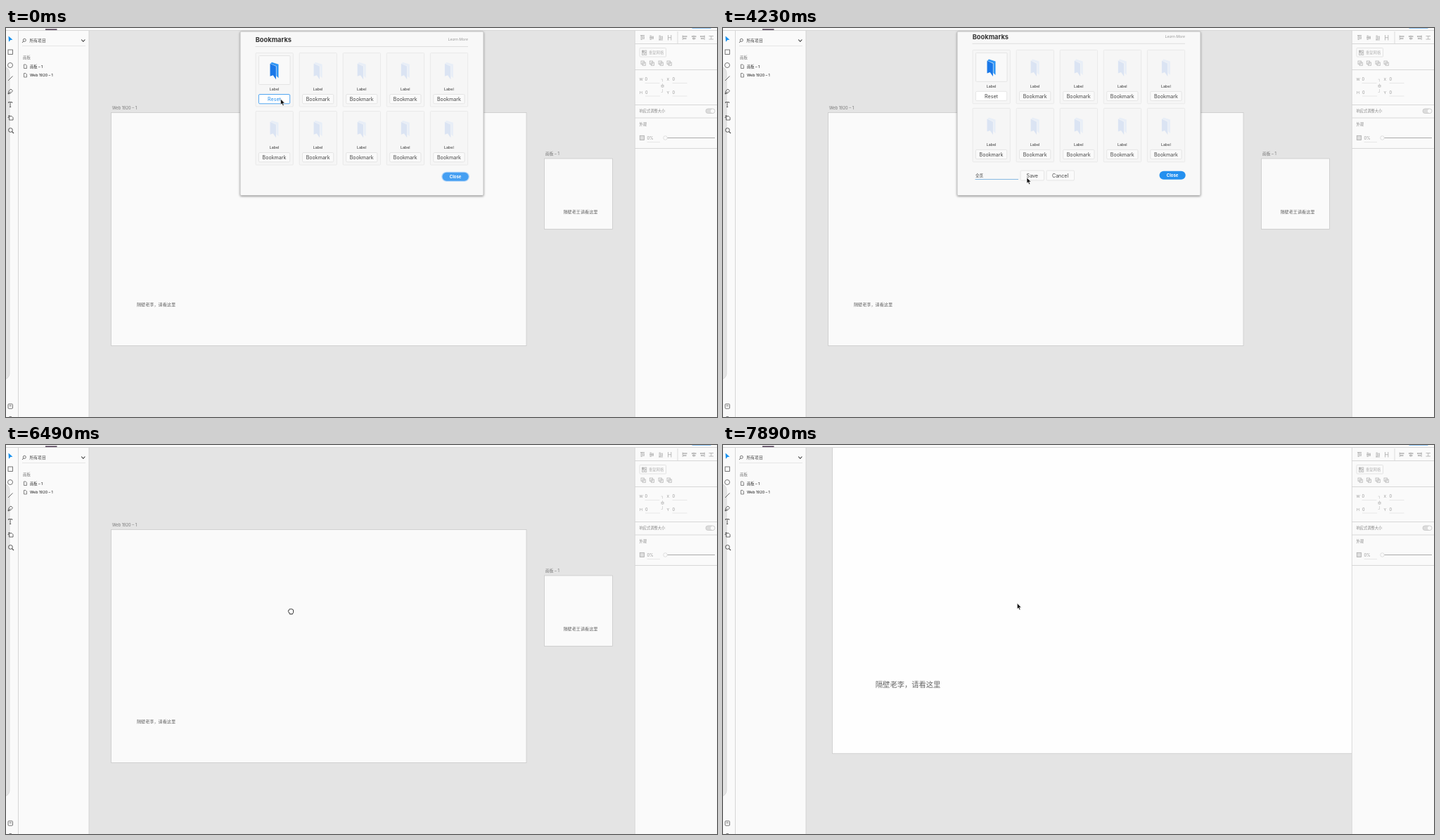
Write an HTML page that moves like this. It is 1011 px wide and 554 px high and loops after 8 s.

```html
<!DOCTYPE html>
<html lang="zh-CN">
<head>
<meta charset="utf-8">
<title>Bookmarks</title>
<style>
html, body { margin: 0; width: 100%; height: 100%; overflow: hidden; background: #e4e4e4; }
svg { display: block; width: 100%; height: 100%; }
text { font-family: Inter, "Noto Sans CJK SC", "Noto Sans CJK", sans-serif; white-space: pre; }
</style>
</head>
<body>
<svg viewBox="0 0 1011 554">
  <defs>
    <filter id="shadow" x="-10%" y="-20%" width="120%" height="150%">
      <feDropShadow dx="0" dy="1" stdDeviation="1.6" flood-opacity=".4"/>
    </filter>
  </defs>
  <g id="board"></g>
  <g id="panels"></g>
  <g id="dialog"></g>
  <g id="cursor"></g>
</svg>
<script>
const LOOP = 8000;
const layer = id => document.getElementById(id);

const rect = (x, y, w, h, fill, stroke = 'none', r = 0, extra = '') =>
  `<rect x="${x}" y="${y}" width="${w}" height="${h}" rx="${r}" fill="${fill}" stroke="${stroke}" stroke-width=".8" ${extra}/>`;
const path = (d, stroke, fill = 'none', width = .9) =>
  `<path d="${d}" stroke="${stroke}" fill="${fill}" stroke-width="${width}"/>`;
const text = (x, y, size, fill, str, extra = '') =>
  `<text x="${x}" y="${y}" font-size="${size}" fill="${fill}" ${extra}>${str}</text>`;
const centred = (x, y, size, fill, str, extra = '') =>
  text(x, y, size, fill, str, 'text-anchor="middle" ' + extra);
const move = (x, y, content) => `<g transform="translate(${x} ${y})">${content}</g>`;

// Each track entry is [start time, ...values]; values hold until the next entry.
const at = (track, t) => track.findLast(entry => entry[0] <= t).slice(1);

const POINTER = [
  [0, 390.5, 101], [170, 388.5, 99.5], [500, 386, 91], [850, 380, 86],
  [1210, 372, 130], [1390, 358, 185], [1560, 335, 208], [1740, 323, 210],
  [3870, 335, 210], [4050, 380, 213], [4230, 432, 213], [4400, 440, 212],
  [4760, 589, 207], [4970, 655, 211], [5150, 644, 212], [5320, 639.3, 211.5],
  [5860, 560, 250], [6030, 268, 280], [6210, 320, 292], [6490, 405, 237],
  [6670, 545, 168], [6810, 553, 153], [7380, 417.3, 225.3], [7890, 418.3, 225.3]
];
// Left, top and zoom of the large artboard.
const CAMERA = [
  [0, 149.5, 120.5, 1], [6670, 289.5, 51.5, 1], [6810, 297.5, 36.5, 1],
  [7380, 265.5, 8, 1.154], [7650, 210.5, -55, 1.417], [7890, 155.5, -118.5, 1.68]
];
const TYPING = [
  [0, 'Label', ''],
  [2270, 'q', '去 请 却 前 钱 其 起 群'],
  [2450, 'qu', '去 取 区 曲 趣 渠 屈 驱'],
  [2620, 'quan', '全 圈 权 泉 劝 拳 犬 券'],
  [2800, 'quan l', '全力 全 圈 权 泉 劝 拳 犬'],
  [2980, 'quan lan', '全览 全 圈 权 泉 劝 拳 犬'],
  [3510, '全览', '']
];
const EDIT_START = 1030, EDIT_END = 4580, DIALOG_END = 5680, GRAB = [6490, 7380];

function drawBoard(t) {
  const [left, top, zoom] = at(CAMERA, t);
  const paper = t < GRAB[0] + 180 ? '#fafafa' : '#fefefe';
  const artboard = (dx, dy, w, h, name, tx, ty, note) => {
    const x = left + dx * zoom, y = top + dy * zoom;
    return rect(x, y, w * zoom, h * zoom, paper, '#cacaca')
      + text(x + 1.5, y - 4.8, 5.7, '#777', name)
      + text(x + tx * zoom, y + ty * zoom, 6.13 * zoom, '#666', note);
  };
  return rect(0, 0, 1011, 554, '#e4e4e4')
    + artboard(0, 0, 590.5, 332, 'Web 1920 – 1', 36.5, 275.8, '隔壁老李，请看这里')
    + artboard(616, 65.5, 97, 100.5, '画板 – 1', 27, 78.1, '隔壁老王请看这里');
}

function drawTools() {
  const ink = '#555';
  return rect(0, 3.5, 118, 551, '#fafafa')
    + rect(-9, 56, 14, 444, '#e4e4e4', '#d2d2d2', 8)
    + path('M17.5 3.5V554M118 3.5V554', '#d2d2d2')
    + path('M3.5 11.5L9.5 16.7L6.4 17L4 19.8Z', 'none', '#1590f0')
    + rect(3, 31, 6.5, 6.5, 'none', ink)
    + `<circle cx="6" cy="53" r="3.5" fill="none" stroke="${ink}" stroke-width=".8"/>`
    + path('M3 75L9.5 68.5', ink)
    + path('M3 94L4 89.5L7 87L9.5 89.5L7 92.5ZM3 94L6.3 90.6', ink)
    + path('M3.5 107V105.5H8.7V107M6.1 105.5V112.5M5 112.5H7.2', ink)
    + path('M4.5 124V131H10V127.5L8 125.5H3M2.5 127.5H4.5', ink)
    + `<circle cx="6.4" cy="145.4" r="2.9" fill="none" stroke="${ink}"/>` + path('M8.5 147.5L11 150', ink, 'none', 1.2)
    + rect(3, 535.5, 6.5, 6.5, 'none', ink, 1) + path('M4.5 538H8M4.5 553.7H8', ink);
}

function drawLeftPanel() {
  const file = (y, name) => path(`M25.5 ${y - 2.5}H28L29.5 ${y - 1}V${y + 3}H25.5Z`, '#555', 'none', .7)
    + text(34, y + 2.2, 5.3, '#333', name, 'font-weight="500"');
  return `<circle cx="26.3" cy="17.3" r="2" fill="none" stroke="#555" stroke-width=".8"/>`
    + path('M24.9 18.8L23 21', '#555')
    + text(33.5, 20.2, 5.8, '#444', '所有项目')
    + path('M107.2 16.5L109.8 19.3L112.4 16.5', '#333', 'none', 1.1)
    + path('M23 25.5H113', '#dedede', 'none', .7)
    + text(24, 44.2, 5.4, '#777', '画板')
    + file(54.5, '画板 – 1') + file(67, 'Web 1920 – 1');
}

function drawRightPanel() {
  const soft = '#b4b4b4', line = '#dadada';
  const vertical = (x, edge) => path(`M${x - 3} ${edge}H${x + 3}`, soft)
    + rect(x - 2, 11, 1.3, 5.5, 'none', soft) + rect(x + 1, 12, 1.3, 3.5, 'none', soft);
  const horizontal = (x, edge) => path(`M${x + edge} 10.5V17`, soft)
    + rect(x - 2.5, 11.5, 5.5, 1.2, 'none', soft) + rect(x - 1.5, 14.5, 3.5, 1.2, 'none', soft);
  const field = (x, y, name) => text(x, y + 2, 5.3, '#999', name)
    + text(x + 8, y + 2.1, 5.6, '#999', '0') + path(`M${x + 8} ${y + 5.5}H${x + 29}`, line, 'none', .6);
  const combine = x => rect(x - 3, 47, 4.3, 4.3, 'none', soft) + rect(x - 1, 49, 4.3, 4.3, 'none', soft);
  return rect(894, 3.5, 118, 551, '#fafafa')
    + path('M894.3 3.5V554M894 22.5H1011M894 59.5H1011M894 109.5H1011M894 128H1011M894 171.5H1011', '#d4d4d4')
    + path('M955 5V22', line)
    + vertical(905, 10.5) + vertical(918, 13.7) + vertical(931, 17) + path('M941.5 10V17.5M945.8 10V17.5M941.5 13.7H945.8', soft)
    + horizontal(965, -2.8) + horizontal(978, 0) + horizontal(990, 3.2) + path('M999.5 11.5H1006M999.5 16H1006M1002.7 11.5V16', soft)
    + rect(901, 28.5, 37.5, 12.5, 'none', '#dedede', 1)
    + rect(904.5, 32, 2.5, 2.5, soft, soft) + rect(908.3, 32, 2.5, 2.5, 'none', soft)
    + rect(904.5, 35.8, 2.5, 2.5, 'none', soft) + rect(908.3, 35.8, 2.5, 2.5, 'none', soft)
    + text(914, 37, 5.3, soft, '重复网格')
    + [906, 918.3, 931, 943].map(combine).join('')
    + field(900.5, 73, 'W') + field(939.5, 73, 'X') + field(901, 91.5, 'H') + field(939.5, 91.5, 'Y')
    + path('M931.5 73H933.5V76.5M933.5 87V91.5H931.5M933.5 79V85', '#ccc', 'none', .7)
    + rect(932, 81.5, 3, 2.4, '#fafafa', soft)
    + text(900.5, 120.2, 5.25, '#888', '响应式调整大小')
    + rect(995, 115, 13, 6.5, '#dcdcdc', '#c6c6c6', 3.2) + '<circle cx="1004.7" cy="118.2" r="2.7" fill="#fafafa"/>'
    + text(900.5, 139.2, 5.25, '#888', '外观')
    + rect(901.3, 153.3, 6.2, 6.2, '#dedede', '#aaa')
    + text(911.5, 158.6, 5.7, '#999', '0%') + path('M911.5 162.5H930', line, 'none', .6)
    + path('M937 156.5H1008', '#aaa', 'none', 1.1)
    + '<circle cx="937.5" cy="156.5" r="2.8" fill="#fafafa" stroke="#d4d4d4" stroke-width=".7"/>';
}

function drawTopStrip() {
  return rect(0, 0, 1011, 3.5, '#fafafa') + path('M0 3.5H1011', '#d4d4d4')
    + rect(56, 1.3, 16.5, 1.7, '#5c4a60')
    + rect(973.5, -8, 31, 8.6, '#2490ef', 'none', 4);
}

function drawCard(index, t) {
  const first = index === 0;
  const x = 355 + index % 5 * 62.1, y = index < 5 ? 35.5 : 118.5;
  const focused = first && t < 500;
  const front = first ? '#1a78e8' : '#dbe4f3', back = first ? '#2f96f5' : '#e8eef7';
  const label = first && t >= EDIT_END ? '全览' : 'Label';
  return move(x, y,
    rect(0, 0, 53.3, 76.5, '#f6f6f6', '#e6e6e6', 1)
    + (first ? rect(4.5, 4, 44.5, 41, '#f9f9f9', '#e0e0e0', 1) : '')
    + move(26.5, 24.7, path('M-3.5 -11.5L6 -8.5V11L3 8V-6L-5.5 -9.5Z', 'none', back)
      + path('M-6 -9.5L2.4 -5.6V13L-1.8 7L-6 8.5Z', 'none', front))
    + centred(26.5, 53.7, 5.3, '#333', label)
    + rect(4.4, 59, 44.3, 13.3, first ? '#fff' : '#fafafa', focused ? '#2790ee' : '#e0e0e0', 1.5)
    + centred(26.5, 68.3, 7.1, focused ? '#2790ee' : '#444', first ? 'Reset' : 'Bookmark'));
}

function drawCandidates(list) {
  const words = list.split(' ');
  let x = 353.5;
  let out = rect(350, 216.8, 204, 14, '#fcfcfc', '#b8b8b8', 3.5, 'filter="url(#shadow)"')
    + rect(352, 218.3, 8.3 + words[0].length * 8.4, 11, '#d3e6fb', 'none', 1.5);
  words.forEach((word, i) => {
    out += text(x, 225.8, 5.6, '#999', i + 1) + text(x + 5, 226.8, 8.4, '#111', word, 'font-weight="500"');
    x += 11.8 + word.length * 8.4;
  });
  return out + path('M544 222.2L546.7 224.8L549.4 222.2', '#888');
}

function drawEditor(t) {
  const [value, candidates] = at(TYPING, t);
  const selected = value === 'Label', composing = candidates !== '';
  const width = value.length * 2.95;
  return (selected ? rect(358.7, 206, 15.3, 8, '#a9cff6') : '')
    + text(359, 212.2, 5.6, '#444', value, composing ? 'text-decoration="underline"' : '')
    + (composing ? path(`M${359 + width} 206.3V214`, '#333', 'none', .7) : '')
    + path('M358.5 215.5H420', '#6ba9dc', 'none', .8)
    + rect(423, 203, 33.5, 14, '#fafafa', '#e0e0e0', 1.5) + centred(439.8, 212.7, 7.1, '#444', 'Save')
    + rect(460, 203, 39.5, 14, '#fafafa', '#e0e0e0', 1.5) + centred(479.6, 212.7, 7.1, '#444', 'Cancel')
    + (composing ? drawCandidates(candidates) : '');
}

function drawDialog(t) {
  if (t >= DIALOG_END) return '';
  const editing = t >= EDIT_START && t < EDIT_END;
  const closeFocused = t < EDIT_START, closeHovered = t >= 4970;
  const closeFill = closeFocused ? '#459ff2' : closeHovered ? '#1985e6' : '#2490ef';
  const cards = Array.from({ length: 10 }, (_, i) => drawCard(i, t)).join('');
  return rect(333, 5, 346, 233.5, '#f8f8f8', '#b4b4b4', 1.5, 'filter="url(#shadow)"')
    + move(0, editing ? -4.2 : 0,
      text(354.7, 20.2, 9.3, '#333', 'Bookmarks', 'font-weight="700"')
      + text(657, 18.3, 5.2, '#999', 'Learn More', 'text-anchor="end" font-style="italic"')
      + path('M354.5 26.5H657', '#dcdcdc') + cards)
    + move(0, editing ? -2 : 0,
      (closeFocused ? rect(619.2, 204.8, 39.8, 14, '#b5d7f9', 'none', 7) : '')
      + rect(620.5, 205.8, 37.2, 12, closeFill, 'none', 6)
      + centred(639.1, 214, 6, '#fff', 'Close', 'font-weight="700"'))
    + (editing ? drawEditor(t) : '');
}

function drawCursor(t) {
  const [x, y] = at(POINTER, t);
  const grabbing = t >= GRAB[0] && t < GRAB[1];
  return move(x, y, grabbing
    ? path('M-3.2 .5C-4.2 -.8 -3.4 -2 -2.4 -1.6C-2.6 -3.8 -.8 -3.8 -.5 -3C.2 -4 1.5 -3.6 1.6 -2.8C2.8 -3.3 3.6 -2.5 3.6 -1.2V.8C3.6 2.4 2.5 2.6 2.4 3.8H-1.6C-1.7 2.4 -2.6 1.8 -3.2 .5Z', '#222', '#fff', 1)
    : path('M0 0V8.3L1.9 6.6L3.2 9.7L4.7 9.1L3.4 6.1H5.9Z', '#fff', '#111', .6));
}

layer('panels').innerHTML = drawTools() + drawLeftPanel() + drawRightPanel() + drawTopStrip();

const scenes = { board: drawBoard, dialog: drawDialog, cursor: drawCursor };
const shown = {};
const start = performance.now();

function frame() {
  const t = (performance.now() - start) % LOOP;
  for (const id in scenes) {
    const markup = scenes[id](t);
    if (markup !== shown[id]) layer(id).innerHTML = shown[id] = markup;
  }
  requestAnimationFrame(frame);
}
frame();
</script>
</body>
</html>
```
